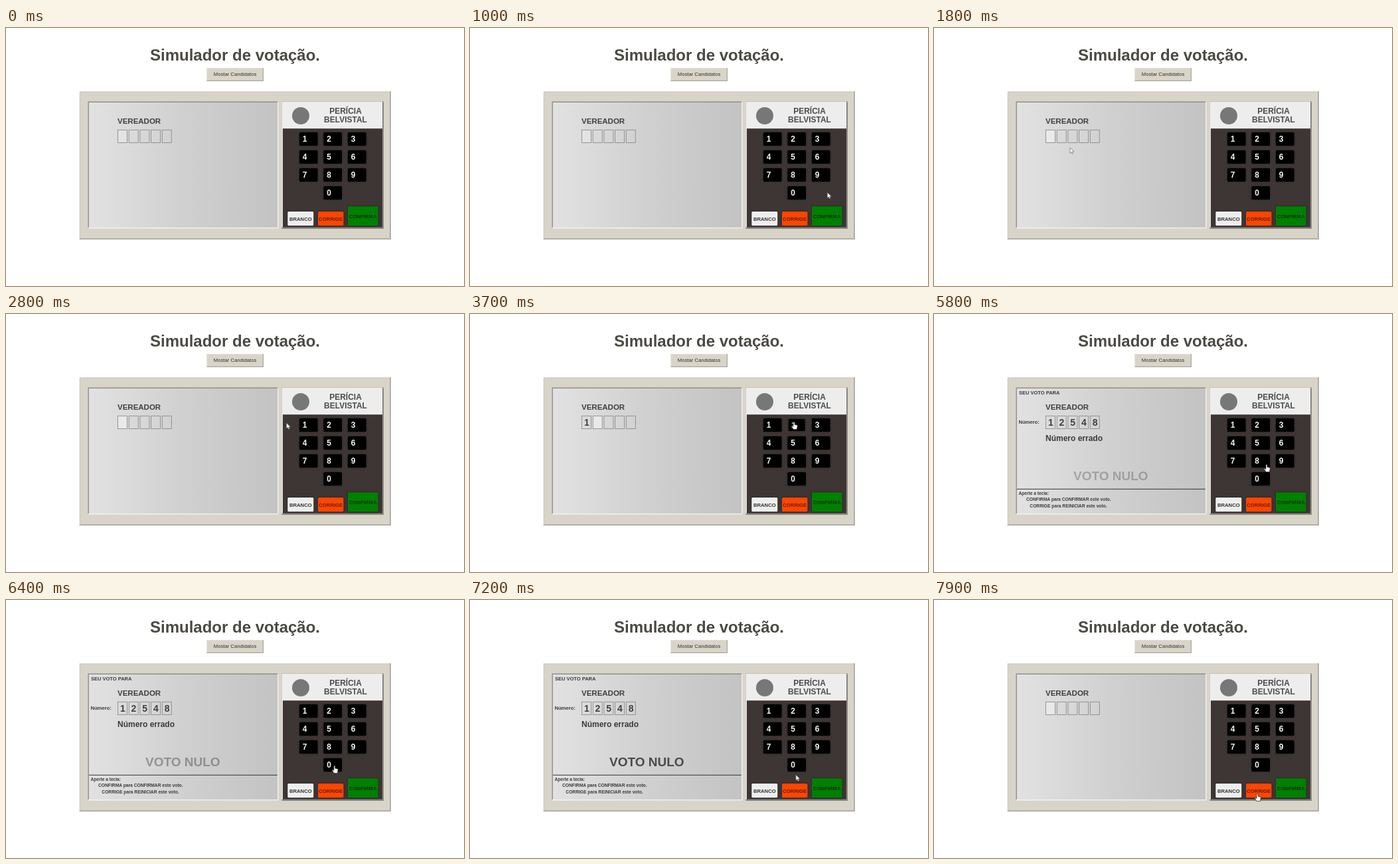
An HTML page for the animation above (8000 ms loop, 690 by 388 pixels).

```html
<!DOCTYPE html>
<html lang="pt">
<head>
<meta charset="utf-8">
<title>Simulador de votação</title>
<style>
html, body { margin: 0; width: 100%; height: 100%; overflow: hidden; background: #fff; }
svg { display: block; font-family: "Liberation Sans", Arial, sans-serif; font-weight: bold; }
.soft { filter: drop-shadow(0 .5px 1.5px #0007); }
</style>
</head>
<body>
<svg id="stage" width="690" height="388" viewBox="0 0 690 388">
  <defs>
    <linearGradient id="glass">
      <stop offset="0" stop-color="#e2e2e2"/>
      <stop offset=".5" stop-color="#d0d0d0"/>
      <stop offset="1" stop-color="#c3c3c3"/>
    </linearGradient>
  </defs>
</svg>
<script>
const LOOP = 8000, RESET = 7700, LOW = 0.35;
const stage = document.getElementById("stage");

function add(tag, attrs, parent = stage, content = "") {
  const el = document.createElementNS("http://www.w3.org/2000/svg", tag);
  for (const name in attrs) el.setAttribute(name, attrs[name]);
  el.textContent = content;
  parent.append(el);
  return el;
}

const rect = (x, y, width, height, fill, parent, more) =>
  add("rect", { x, y, width, height, fill, ...more }, parent);

const text = (str, x, y, size, fill, parent, more) =>
  add("text", { x, y, "font-size": size, fill, ...more }, parent, str);

const centred = { "text-anchor": "middle" };

// Box with a two-tone edge: top/left in one colour, bottom/right in the other
function bevel(x, y, w, h, fill, light, dark, edge, parent) {
  rect(x, y, w, h, fill, parent);
  const line = { fill: "none", "stroke-width": edge }, e = edge / 2;
  add("path", { d: `M${x + e} ${y + h}V${y + e}H${x + w}`, stroke: light, ...line }, parent);
  add("path", { d: `M${x} ${y + h - e}H${x + w - e}V${y}`, stroke: dark, ...line }, parent);
}

// Page heading and list button
text("Simulador de votação.", 345, 48.5, 24, "#4b4943", stage, centred);
bevel(302.5, 60, 85.5, 20, "#d9d4c8", "#e0dcd2", "#aaa69c", 1.2);
text("Mostar Candidatos", 345, 72.3, 7.7, "#333", stage, { ...centred, "font-weight": "normal" });

// Machine
bevel(110.8, 95.6, 469, 222.4, "#d9d4c8", "#d0ccc1", "#a5a29a", 1.5);
bevel(123.4, 110.6, 287.2, 191, "url(#glass)", "#8f8f8f", "#f1f1f1", 1.5);
bevel(415.2, 110.6, 153.6, 191, "#3d3635", "#f0eee9", "#8e8b87", 1.8);
rect(417, 112, 150, 39.2, "#ededed");
add("circle", { cx: 444, cy: 132, r: 13, fill: "#777" });
text("PERÍCIA", 511.5, 128.7, 12, "#4d4d4d", stage, centred);
text("BELVISTAL", 511.5, 142.2, 12, "#4d4d4d", stage, centred);

// Keys
const hits = [];
function button(x, y, w, h, fill) {
  hits.push([x, y, w, h]);
  const g = add("g", { class: "soft" });
  rect(x, y, w, h, fill, g, { rx: 1.5 });
  return { g, cx: x + w / 2, cy: y + h / 2 };
}

const keys = {};
for (let n = 0; n < 10; n++) {
  const col = n ? (n - 1) % 3 : 1, row = n ? Math.floor((n - 1) / 3) : 3;
  const x = 442 + col * 36.5, y = 157 + row * 27;
  keys[n] = button(x, y, 27.5, 20, "#000");
  text(n, x + 4.8, y + 14.4, 12, "#f4f4f4", keys[n].g);
}

function action(label, x, y, w, h, fill, ink, base) {
  const key = keys[label] = button(x, y, w, h, fill);
  text(label, key.cx, base, 7.7, ink, key.g, centred);
}
action("BRANCO", 424.3, 276, 39, 21.3, "#eee", "#333", 289.6);
action("CORRIGE", 470, 276, 38.5, 21.3, "#ff4500", "#5c2413", 289.6);
action("CONFIRMA", 515, 268.3, 45.6, 29, "#008000", "#12330f", 285.6);

// Screen contents
text("VEREADOR", 168, 144.4, 11.5, "#404040");

const presses = [[1, 3200], [2, 3900], [5, 4300], [4, 5000], [8, 5600], ["CORRIGE", RESET]];
const slots = presses.slice(0, 5).map(([digit], i) => {
  const x = 168.5 + i * 16.7;
  const box = rect(x, 153.3, 14, 19.2, "#fff", stage, { stroke: "#8c8c8c", "stroke-width": 0.9 });
  const label = text(digit, x + 7.3, 167.7, 14, "#404040", stage, centred);
  return { box, label };
});

const result = add("g", {});
[
  ["SEU VOTO PARA", 128, 121.3, 7.5],
  ["Número:", 127.5, 165, 7.6],
  ["Número errado", 168, 191, 12],
  ["Aperte a tecla:", 127.5, 272.3, 6.6],
  ["CONFIRMA para CONFIRMAR este voto.", 139, 281.3, 6.7],
  ["CORRIGE para REINICIAR este voto.", 144.3, 290.5, 6.7],
].forEach(([str, x, y, size]) => text(str, x, y, size, "#3a3a3a", result));
rect(125, 262.8, 284, 1, "#333", result);
const nullVote = text("VOTO NULO", 210, 250, 19, "#484848", result);

// Pointers, tip at 0,0
const arrow = add("path", {
  d: "M0 0V8.2L2 6.5L3.3 9.3L4.7 8.6L3.4 5.9H6Z",
  fill: "#fff", stroke: "#666", "stroke-width": 0.7
});
const hand = add("path", {
  d: "M-1 1Q0-.8 1 1V4.2L4.6 5Q5.4 5.3 5.3 6.5L4.5 11.5H-1L-3.4 7.3Q-3.4 6-2.2 6.4L-1 7.5Z",
  fill: "#fff", stroke: "#222", "stroke-width": 0.7
});

// time, x, y of the pointer tip
const path = [
  [900, 613, 259], [1200, 330, 215], [1450, 76, 196], [1800, 205, 180],
  [2200, 330, 226], [2600, 419, 164], [2750, 419, 164], [3000, 452, 164],
  [3250, 452, 164], [3600, 488, 162], [3900, 488, 162], [4150, 489, 191],
  [4300, 489, 191], [4600, 465, 192], [5000, 465, 192], [5400, 490, 221],
  [5600, 492, 222], [5800, 501, 226], [6000, 501, 227], [6700, 491, 263],
  [7200, 491, 263], [7500, 487, 291], [LOOP, 487, 291]
];

function pointer(t) {
  const i = path.findIndex(p => p[0] > t);
  const [t0, x0, y0] = path[i - 1], [t1, x1, y1] = path[i];
  const u = (t - t0) / (t1 - t0), k = u * u * (3 - 2 * u);
  return [x0 + (x1 - x0) * k, y0 + (y1 - y0) * k];
}

// Once a second: a short rise and fall from 0 to 1, then a rest
function swell(t) {
  const d = (t + 330) % 1000 - 500;
  return Math.abs(d) < 320 ? (1 + Math.cos(Math.PI * d / 320)) / 2 : 0;
}

const show = (el, on) => el.setAttribute("visibility", on ? "visible" : "hidden");

function draw(t) {
  const typed = t < RESET ? presses.filter(p => p[1] <= t).length : 0;
  const pulse = swell(t);
  slots.forEach(({ box, label }, i) => {
    show(label, i < typed);
    box.setAttribute("fill-opacity", i === typed ? 0.4 * (1 - pulse) : 0);
  });
  show(result, typed === 5);
  nullVote.setAttribute("opacity", LOW + (1 - LOW) * pulse);

  for (const [name, time] of presses) {
    const { g, cx, cy } = keys[name], s = t >= time - 200 && t < time ? 0.9 : 1;
    g.setAttribute("transform", `translate(${cx} ${cy}) scale(${s}) translate(${-cx} ${-cy})`);
  }

  const present = t >= path[0][0];
  const [x, y] = present ? pointer(t) : [0, 0];
  const over = hits.some(([l, top, w, h]) => x >= l && x <= l + w && y >= top && y <= top + h);
  show(arrow, present && !over);
  show(hand, present && over);
  for (const el of [arrow, hand]) el.setAttribute("transform", `translate(${x} ${y})`);
}

const start = performance.now();
function frame() {
  draw((performance.now() - start) % LOOP);
  requestAnimationFrame(frame);
}
frame();
</script>
</body>
</html>
```
